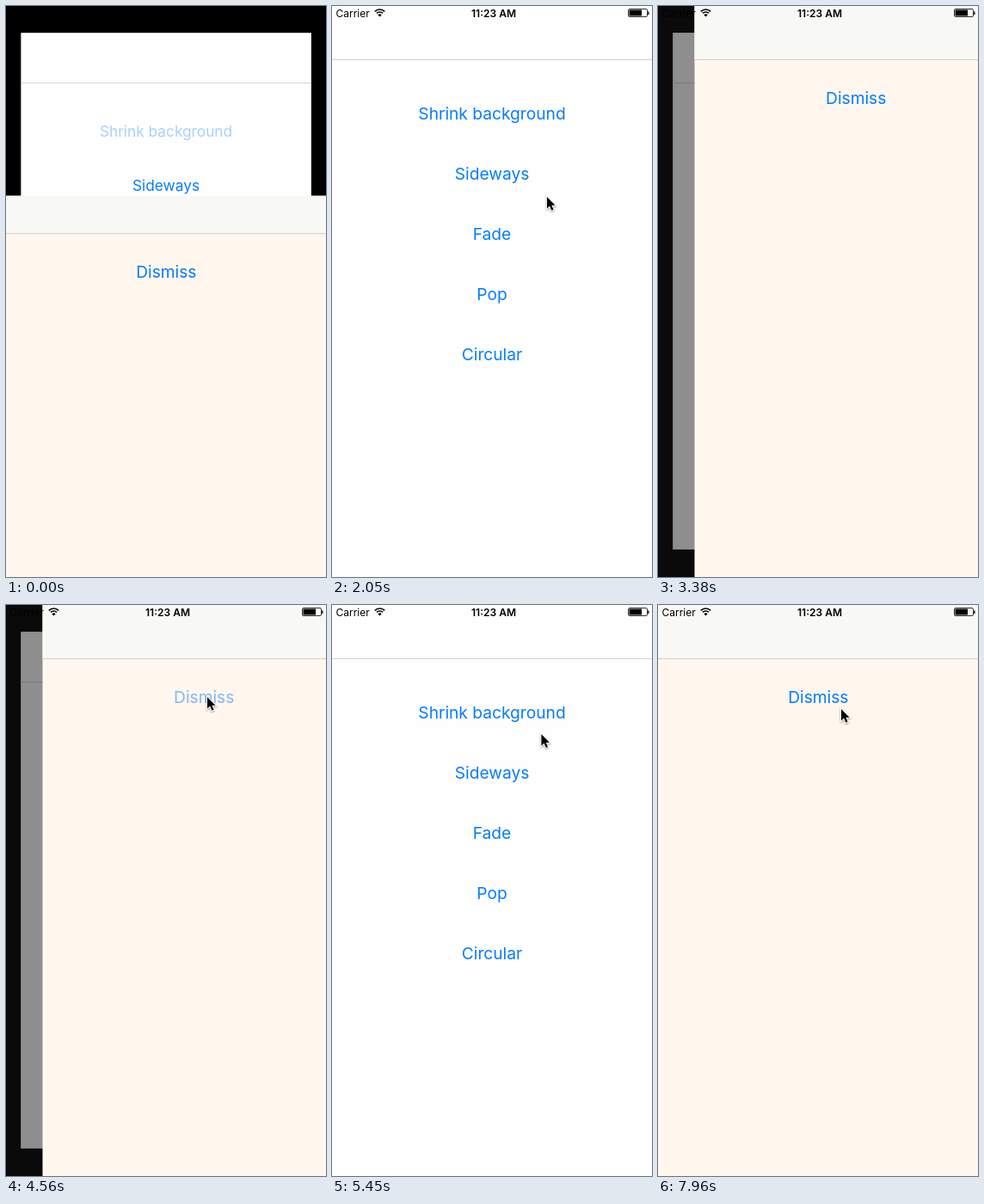
Animation, 372 px wide and 664 px high, one loop 8000 ms. Source, as an HTML page with a canvas:

```html
<!DOCTYPE html>
<html lang="en">
<head>
<meta charset="utf-8">
<title>Transitions</title>
<style>
  html, body { margin: 0; width: 100%; height: 100%; overflow: hidden; background: #000; }
  canvas { display: block; }
</style>
</head>
<body>
<canvas id="stage" width="372" height="664"></canvas>
<script>
const ctx = document.getElementById('stage').getContext('2d');
const LOOP = 8000, STEP = 147.2;
const BLUE = '#057cff', FONT = 'Inter, sans-serif';

// The screen is slightly larger than the visible stage.
const screen = { x: -1.4, y: -2.2, w: 375, h: 667.6, cx: 186.1, cy: 331.6 };
const right = screen.x + screen.w, bottom = screen.y + screen.h;
const SHEET_TOP = 220.7, SHEET_LEFT = 42.5;

// Pointer paths as [time, x, y]; the pointer is hidden outside them.
const trails = [
  [[280, 240, 350], [735, 205, 306], [1030, 205, 306]],
  [[1460, 205, 306], [1760, 238, 250], [2060, 250, 222], [2350, 214, 199], [2490, 214, 199]],
  [[3520, 214, 199], [3680, 226, 172], [3830, 226, 172], [4420, 234, 107], [4700, 234, 107]],
  [[5290, 234, 107], [5590, 252, 190], [5740, 252, 190], [6320, 246, 265], [6640, 246, 265],
   [7350, 240, 143], [7660, 240, 143], [7945, 213, 121], [8000, 213, 121]]
];

const within = (t, from, to) => t >= from && t < to;
const mix = (a, b, k) => a + (b - a) * k;

function ease(t, start, duration) {
  const u = Math.min(1, Math.max(0, (t - start) / duration));
  return (1 - Math.cos(Math.PI * u)) / 2;
}

function rect(color, x, y, w, h) {
  ctx.fillStyle = color;
  ctx.fillRect(x, y, w, h);
}

function label(text, x, y, alpha = 1) {
  ctx.save();
  ctx.globalAlpha *= alpha;
  ctx.fillStyle = BLUE;
  ctx.font = '19.2px ' + FONT;
  ctx.textAlign = 'center';
  ctx.fillText(text, x, y + 7);
  ctx.restore();
}

function menu(t, scale, dim) {
  const { x, y, w, h, cx, cy } = screen;
  const items = [
    ['Shrink background', t < 1377 ? 0.35 : 1],
    ['Sideways', within(t, 2490, 5212) ? 0.62 : 1],
    ['Fade', within(t, 6460, 7300) ? 0.6 : 1],
    ['Pop', 1],
    ['Circular', 1]
  ];
  ctx.save();
  ctx.translate(cx, cy);
  ctx.scale(scale, scale);
  ctx.translate(-cx, -cy);
  rect('#fefefe', x, y, w, h);
  rect('#d2d2d2', x, 62, w, 1);
  items.forEach(([text, alpha], i) => label(text, 186, 125 + 70 * i, alpha));
  if (dim) rect(`rgba(0,0,0,${dim})`, x, y, w, h);
  ctx.restore();
}

function sheet(x, top, line, alpha, textAlpha) {
  ctx.save();
  ctx.globalAlpha = alpha;
  rect('#fff7ed', x, top, screen.w, 700);
  rect('#f8f8f4', x, top, screen.w, line - top);
  rect('#cdcdca', x, line, screen.w, 1);
  label('Dismiss', x + 187.7, line + 45, textAlpha);
  ctx.restore();
}

function statusBar() {
  ctx.fillStyle = ctx.strokeStyle = '#000';
  ctx.textAlign = 'left';
  ctx.font = '12px ' + FONT;
  ctx.fillText('Carrier', 4.5, 12.5);
  ctx.textAlign = 'center';
  ctx.font = '600 12px ' + FONT;
  ctx.fillText('11:23 AM', 188, 12.5);

  ctx.lineWidth = 1.7;
  for (const r of [8, 5]) {
    ctx.beginPath();
    ctx.arc(55.5, 12, r, -Math.PI * 0.75, -Math.PI * 0.25);
    ctx.stroke();
  }
  ctx.beginPath();
  ctx.moveTo(55.5, 12.5);
  ctx.arc(55.5, 12.5, 3, -Math.PI * 0.75, -Math.PI * 0.25);
  ctx.fill();

  ctx.lineWidth = 0.8;
  ctx.beginPath();
  ctx.roundRect(344.5, 3.5, 22, 9, 1.5);
  ctx.stroke();
  rect('#000', 345.5, 4.5, 14.5, 7);
  rect('#000', 367.2, 6.5, 1.3, 3.5);
}

const arrow = new Path2D('M0 0V13.5L3.1 10.6L5.4 15.8L7.6 14.8L5.4 9.8H9.6Z');

function pointer(t) {
  const trail = trails.find(p => within(t, p[0][0], p[p.length - 1][0]));
  if (!trail) return;
  const i = trail.findIndex(p => p[0] > t);
  const [a, b] = [trail[i - 1], trail[i]];
  const k = (t - a[0]) / (b[0] - a[0]);
  ctx.save();
  ctx.translate(mix(a[1], b[1], k), mix(a[2], b[2], k));
  ctx.shadowColor = 'rgba(0,0,0,0.4)';
  ctx.shadowBlur = 2;
  ctx.shadowOffsetY = 1;
  ctx.strokeStyle = '#fff';
  ctx.lineWidth = 2;
  ctx.stroke(arrow);
  ctx.shadowColor = 'transparent';
  ctx.fillStyle = '#000';
  ctx.fill(arrow);
  ctx.restore();
}

function draw(t) {
  const rise = 1 - ease(t, 1037, 340);
  const slide = ease(t, 2895, 450) - ease(t, 4761, 450);
  const fade = ease(t, 6546, 650);
  const pressed = within(t, 950, 1400) || within(t, 4490, 5220) ? 0.5 : 1;

  const glow = Math.round(10 * slide ** 4);
  rect(`rgb(${glow},${glow},${glow})`, 0, 0, 372, 664);
  menu(t, 1 - 0.1 * (rise + slide), 0.445 * slide);

  if (rise > 0) {
    const top = mix(bottom, SHEET_TOP, rise);
    sheet(screen.x, top, top + 43.5, 1, pressed);
  }
  if (slide > 0) sheet(mix(right, SHEET_LEFT, slide), screen.y, 62, 1, pressed);
  if (fade > 0) sheet(screen.x, screen.y, 62, fade, 1);

  statusBar();
  pointer(t);
}

function tick() {
  const t = performance.now() % LOOP;
  draw(Math.floor((t + 10) / 147) * STEP);
  requestAnimationFrame(tick);
}
tick();
</script>
</body>
</html>
```
